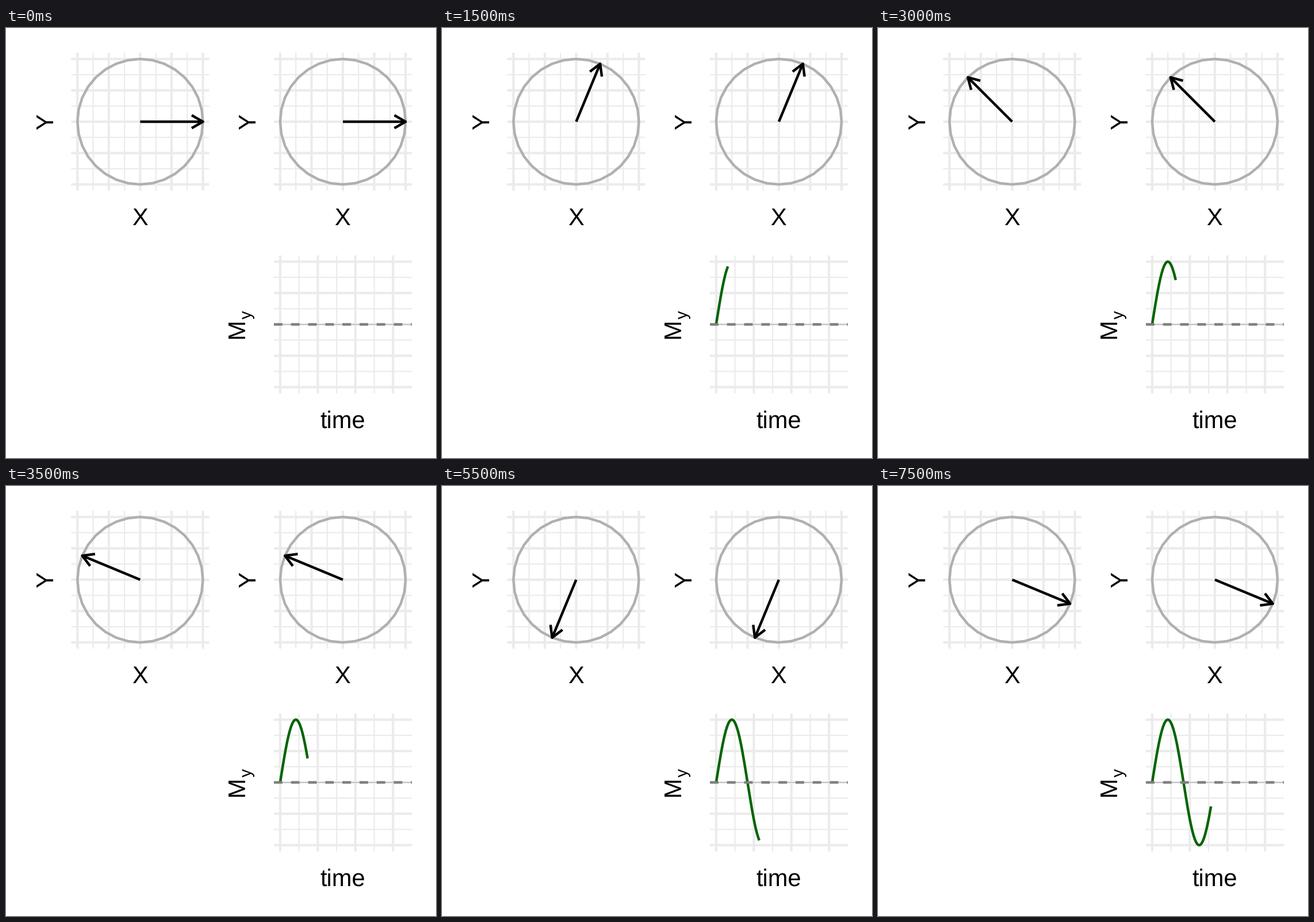
These frames come from a looping animation (748 by 748 pixels, 8 s). A matplotlib script:

```python
import numpy as np
import matplotlib.pyplot as plt
from matplotlib.animation import FuncAnimation

SIZE, DPI = 748, 187
PX = 72 / DPI                     # points per pixel
STEPS, INTERVAL = 16, 500
HALF, R = 120, 109.1              # panel half size, unit radius
LEFT, RIGHT, TOP, LOW = 233.4, 586.0, 163.0, 515.6
LINE, MAJOR, MINOR = 4.45, 4.1, 2.1
FONT = 41.67
HEAD, HEAD_ANGLE = 22.5, np.pi / 6

plt.rcParams["font.family"] = "Liberation Sans"
plt.rcParams["text.hinting"] = "none"

fig = plt.figure(figsize=(SIZE / DPI, SIZE / DPI), dpi=DPI, facecolor="white")
ax = fig.add_axes([0, 0, 1, 1])
ax.set(xlim=(0, SIZE), ylim=(SIZE, 0))
ax.axis("off")


def stroke(x, y, color, width, z, **style):
    style = {"solid_capstyle": "butt", "solid_joinstyle": "round", **style}
    line, = ax.plot(x, y, color=color, lw=width * PX, zorder=z, **style)
    line.set_snap(False)
    return line


def grid(cx, cy, x_major, x_minor):
    y_major = cy + R * np.linspace(-1, 1, 5)
    y_minor = cy + R * np.linspace(-0.75, 0.75, 4)
    for xs, ys, width in ((x_minor, y_minor, MINOR), (x_major, y_major, MAJOR)):
        for x in xs:
            stroke([x, x], [cy - HALF, cy + HALF], "#ebebeb", width, 1)
        for y in ys:
            stroke([cx - HALF, cx + HALF], [y, y], "#ebebeb", width, 1)


def label(x, y, text, rotation=0, size=FONT, ha="center"):
    ax.text(x, y, text, fontsize=size * PX, color="black", rotation=rotation,
            rotation_mode="anchor", ha=ha, va="baseline")


def dial(cx):
    grid(cx, TOP, cx + R * np.linspace(-1, 1, 5),
         cx + R * np.linspace(-0.75, 0.75, 4))
    a = np.linspace(0, 2 * np.pi, 33)
    stroke(cx + R * np.cos(a), TOP - R * np.sin(a), "#b0b0b0", LINE, 2)
    label(cx - 0.8, 343, "X")
    label(cx - 151.8, TOP, "Y", 90)
    return cx, stroke([], [], "black", LINE, 3), stroke([], [], "black", LINE, 3)


dials = [dial(LEFT), dial(RIGHT)]

# Signal chart
start = RIGHT - R
ticks = start + 0.3 * 2 * R * np.arange(4)
grid(RIGHT, LOW, ticks, ticks[:3] + 0.3 * R)
edges = [RIGHT - HALF, RIGHT + HALF]
signal = stroke([], [], "#006400", LINE, 3)
stroke(edges, [LOW, LOW], "#b0b0b0", 1.2, 2)
dash = 14.9 / LINE
stroke(edges, [LOW, LOW], "#7f7f7f", LINE, 4,
       linestyle=(0, (dash, dash)), dash_capstyle="butt")
label(RIGHT - 0.5, 696, "time")
label(414, 540.5, "M", 90, ha="left")
label(427, 505.8, "y", 90, FONT * 0.7, ha="left")


def update(step):
    angle = 2 * np.pi * step / STEPS
    for cx, shaft, head in dials:
        x, y = cx + R * np.cos(angle), TOP - R * np.sin(angle)
        shaft.set_data([cx, x], [TOP, y])
        barbs = angle + np.pi + np.array([-HEAD_ANGLE, HEAD_ANGLE])
        bx, by = x + HEAD * np.cos(barbs), y - HEAD * np.sin(barbs)
        head.set_data([bx[0], x, bx[1]], [by[0], y, by[1]])
    a = np.linspace(0, angle, 12 * step + 1) if step else np.array([])
    signal.set_data(start + R * a / (2 * np.pi), LOW - R * np.sin(a))
    return [signal] + [line for d in dials for line in d[1:]]


anim = FuncAnimation(fig, update, frames=STEPS, interval=INTERVAL,
                     repeat=True, repeat_delay=0)
plt.show()
```
